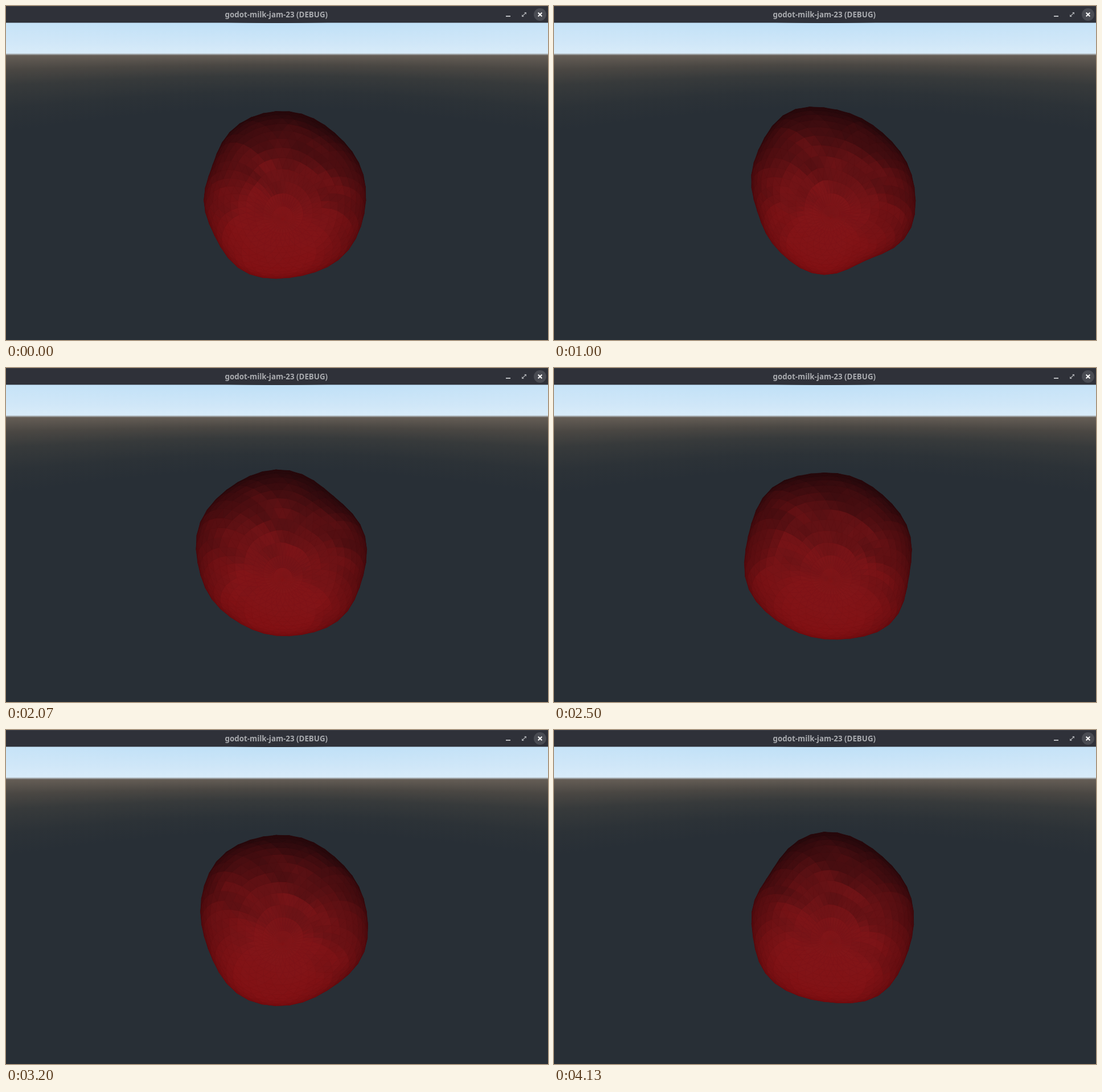
Animation, 952 px wide and 588 px high, one loop 4160 ms. Source, as an HTML page with a canvas:

```html
<!DOCTYPE html>
<html lang="en">
<head>
<meta charset="utf-8">
<title>Blob</title>
<style>
  html, body { margin: 0; width: 100%; height: 100%; overflow: hidden; background: #282f36; }
  canvas, svg { position: absolute; left: 0; top: 0; display: block; }
  text { font: bold 13.33px "Noto Sans", "Open Sans", sans-serif; fill: #a9abaf; }
</style>
</head>
<body>
<canvas id="scene" width="952" height="588"></canvas>
<svg width="952" height="30" fill="none">
  <rect width="952" height="29.5" fill="#2f3139"/>
  <path d="M0 .5H952" stroke="#3b3e46"/>
  <text x="384.6" y="19.5">godot-milk-jam-23 (DEBUG)</text>
  <path d="M878 18H886" stroke="#b9bbbf" stroke-width="2"/>
  <path d="M907.5 17.5L912.5 12.5" stroke="#a9abaf" stroke-width="1.2"/>
  <path d="M910 11H914V15ZM906 15V19H910Z" fill="#a9abaf"/>
  <circle cx="938" cy="15" r="11" fill="#4a4c53"/>
  <path d="M934.7 11.7L941.3 18.3M941.3 11.7L934.7 18.3" stroke="#fff" stroke-width="2"/>
</svg>
<script>
const W = 952, H = 588, LOOP = 4160, TICK = 100 / 3;
const CX = 486, CY = 331, RADIUS = 146, RINGS = 13, SECTORS = 40;
const ctx = document.getElementById('scene').getContext('2d');

// Main swellings of the outline: [degrees clockwise from the right, height]
const poses = [
  { tick: 0, lobes: [[45, 6], [116, 7], [152, -7], [200, -13]] },
  { tick: 13, lobes: [[27, -7], [53, 9], [160, -10], [229, 10]] },
  { tick: 30, lobes: [[27, 8], [63, -15], [130, -9], [165, -13], [243, 16]] },
  { tick: 49, lobes: [[16, 8], [62, -14], [126, -18], [196, 11], [252, 10]] },
  { tick: 75, lobes: [[14, -6], [48, 13], [160, 9], [228, 12]] },
  { tick: 96, lobes: [[26, 9], [84, 6], [116, 9], [160, -5], [224, 7]] },
  { tick: 124, lobes: [[58, 14], [138, 6], [168, -7], [214, -14], [264, 6]] }
];

function makeBackdrop() {
  const cv = document.createElement('canvas');
  cv.width = W;
  cv.height = H;
  const g = cv.getContext('2d');
  const fill = (x, w, y0, y1, stops) => {
    const grad = g.createLinearGradient(0, y0, 0, y1);
    stops.forEach(([p, c]) => grad.addColorStop(p, c));
    g.fillStyle = grad;
    g.fillRect(x, Math.min(y0, y1), w, Math.abs(y1 - y0));
  };
  g.fillStyle = '#282f36';
  g.fillRect(0, 0, W, H);
  for (let x = 0; x < W; x += 2) {
    // Elevation shrinks towards the sides of a perspective view
    const k = Math.hypot(1, (x - 476) / 458);
    fill(x, 2, 85, 85 - 55 * k, [[0, '#d9ecf9'], [.3, '#d0e7f8'], [1, '#bfe0f7']]);
    fill(x, 2, 85, 85 + 95 * k, [[0, '#675f57'], [.2, '#4a4743'],
      [.4, '#373a3b'], [.7, '#2c3237'], [1, '#282f36']]);
  }
  fill(0, W, 83, 87, [[0, '#d9ecf9'], [1, '#675f57']]);
  return cv;
}
const backdrop = makeBackdrop();

// Fast ticks first, a short pause, then mostly every second tick
function poseTick(t) {
  const n = Math.floor((t + 5) / TICK);
  if (n < 30) return Math.min(n, 24);
  const m = (n - 30) % 17;
  return n - (m < 5 ? m % 2 : (m + 1) % 2);
}

function lobe(deg, [at, height]) {
  const d = (deg - at + 540) % 360 - 180;
  return height * Math.exp(-d * d / 576);
}

// Outline radius as a function of the angle in degrees
function outlineAt(tick) {
  const i = Math.max(1, poses.findIndex(p => p.tick >= tick));
  const a = poses[i - 1], b = poses[i];
  const u = (tick - a.tick) / (b.tick - a.tick);
  const swell = 3 * Math.sin(Math.PI * u);
  const sum = (pose, deg) => pose.lobes.reduce((s, l) => s + lobe(deg, l), 0);
  return deg => RADIUS + lobe(deg, [312, -5]) + sum(a, deg) * (1 - u) + sum(b, deg) * u
    + swell * Math.sin(deg * Math.PI / 36 + tick * .35);
}

function bump(x, y, tick) {
  const s = tick * .11;
  const calm = Math.min(1, .2 + Math.hypot(x, y - .38) * 1.1);
  return .011 * calm * (Math.sin(9 * x + 5 * y + s) + Math.sin(13 * y - 4 * x - s * 1.3 + 1)
    + .7 * Math.sin(15 * x + 9 * y + 2.2 - s) + .7 * Math.sin(17 * y - 12 * x + s * .8));
}

function makeVertex(ring, k, outline, tick) {
  const angle = (k + ring % 2 / 2) / SECTORS * 2 * Math.PI;
  const s = Math.sin(ring / RINGS * Math.PI / 2);
  const x = s * Math.cos(angle), y = .3 * (1 - s) + s * Math.sin(angle);
  const r = outline((Math.atan2(y, x) * 180 / Math.PI + 360) % 360);
  const z = Math.sqrt(Math.max(0, 1 - x * x - y * y)) + bump(x, y, tick);
  return { x, y, z, px: CX + x * r, py: CY + y * r };
}

function shade(a, b, c) {
  const ux = b.x - a.x, uy = b.y - a.y, uz = b.z - a.z;
  const vx = c.x - a.x, vy = c.y - a.y, vz = c.z - a.z;
  let nx = uy * vz - uz * vy, ny = uz * vx - ux * vz, nz = ux * vy - uy * vx;
  const len = (Math.hypot(nx, ny, nz) || 1) * (nz < 0 ? -1 : 1);
  nx /= len; ny /= len; nz /= len;
  const red = Math.max(39, Math.min(130, 69 - 7 * nx + 45 * ny + 50 * nz));
  const green = 6 + red * .045 + 10 * nz ** .7 * red / 130;
  return `rgb(${red | 0},${green | 0},${green + 3 | 0})`;
}

function face(a, b, c) {
  ctx.fillStyle = ctx.strokeStyle = shade(a, b, c);
  ctx.beginPath();
  ctx.moveTo(a.px, a.py);
  ctx.lineTo(b.px, b.py);
  ctx.lineTo(c.px, c.py);
  ctx.closePath();
  ctx.fill();
  ctx.stroke();
}

function drawBlob(tick) {
  const outline = outlineAt(tick);
  const mesh = Array.from({ length: RINGS + 1 }, (_, i) =>
    Array.from({ length: SECTORS }, (_, k) => makeVertex(i, k, outline, tick)));
  ctx.lineWidth = .7;
  ctx.lineJoin = 'round';
  for (let i = 0; i < RINGS; i++) {
    const inner = mesh[i], outer = mesh[i + 1];
    for (let k = 0; k < SECTORS; k++) {
      const n = (k + 1) % SECTORS;
      if (i % 2) {
        face(inner[k], outer[k], outer[n]);
        face(inner[k], outer[n], inner[n]);
      } else {
        if (i) face(inner[k], outer[k], inner[n]);
        face(inner[n], outer[k], outer[n]);
      }
    }
  }
}

let start, shown = -1;
function frame(now) {
  start ??= now;
  const tick = poseTick((now - start) % LOOP);
  if (tick !== shown) {
    ctx.drawImage(backdrop, 0, 0);
    drawBlob(tick);
    shown = tick;
  }
  requestAnimationFrame(frame);
}
requestAnimationFrame(frame);
</script>
</body>
</html>
```
